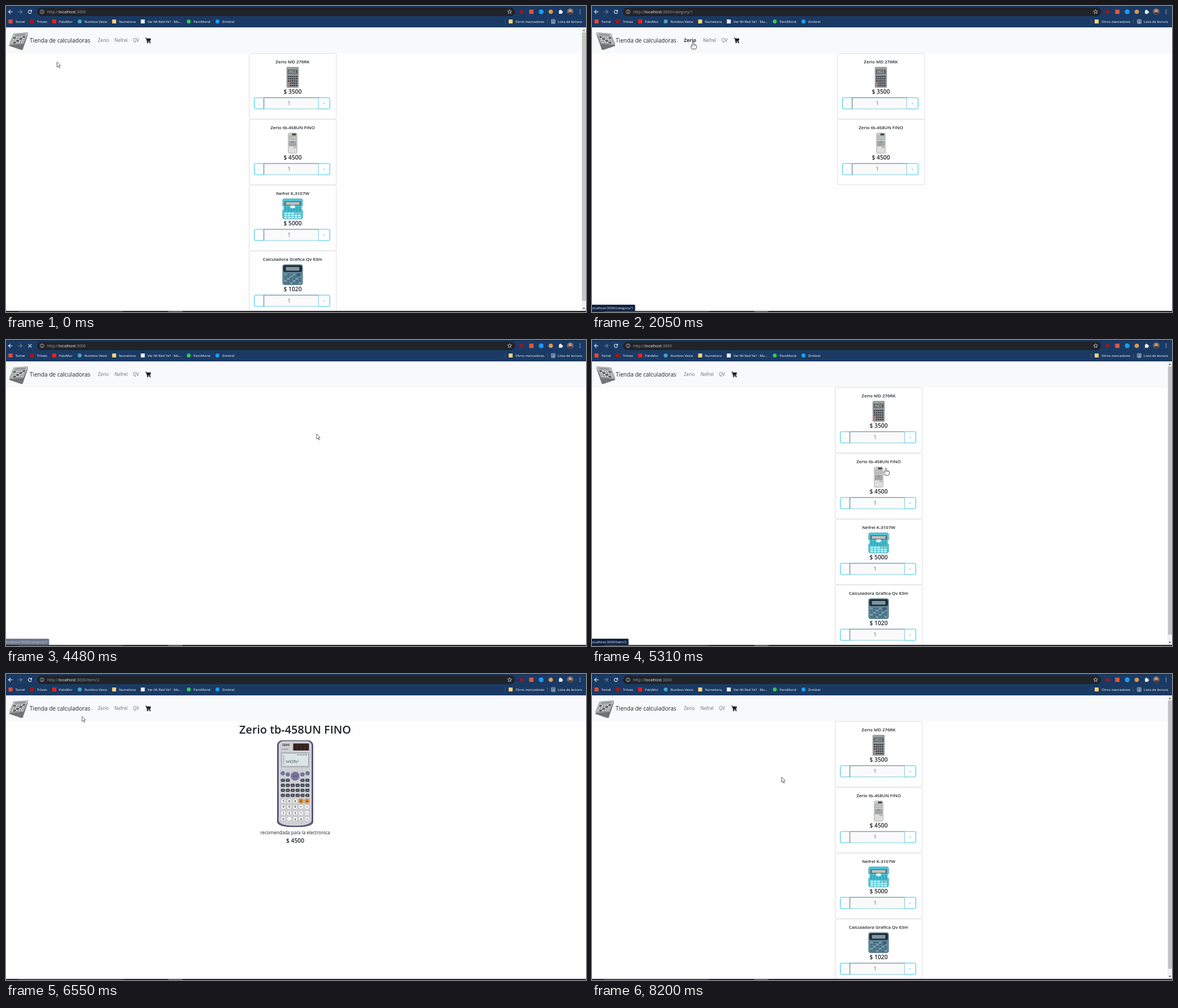
These frames come from a looping animation (1029 px wide and 544 px high, 8530 ms). An HTML page with a canvas:

```html
<!DOCTYPE html>
<html lang="es">
<head>
<meta charset="utf-8">
<title>Tienda de calculadoras</title>
<style>
html, body { margin: 0; width: 100%; height: 100%; overflow: hidden; background: #fefefe; }
canvas { display: block; }
</style>
</head>
<body>
<canvas id="stage" width="1029" height="544"></canvas>
<script>
const W = 1029, H = 544, LOOP = 8530;
const ctx = document.getElementById('stage').getContext('2d');
const FONT = '"Open Sans", "Noto Sans", sans-serif';
const INFO = '#31c3e6', INK = '#212529', PALE = '#e6ebf2';

// ---------- helpers ----------
function rect(x, y, w, h, color) {
  ctx.fillStyle = color;
  ctx.fillRect(x, y, w, h);
}
function paint(fill, stroke, lw = 1) {
  if (fill) { ctx.fillStyle = fill; ctx.fill(); }
  if (stroke) { ctx.strokeStyle = stroke; ctx.lineWidth = lw; ctx.stroke(); }
}
function round(x, y, w, h, r, fill, stroke, lw) {
  ctx.beginPath();
  ctx.roundRect(x, y, w, h, r);
  paint(fill, stroke, lw);
}
function arc(x, y, r, fill, stroke, lw, from = 0, to = 2 * Math.PI) {
  ctx.beginPath();
  ctx.arc(x, y, r, from, to);
  paint(fill, stroke, lw);
}
function shape(pts, fill, stroke, lw) {
  ctx.beginPath();
  for (let i = 0; i < pts.length; i += 2) ctx.lineTo(pts[i], pts[i + 1]);
  if (fill) ctx.closePath();
  paint(fill, stroke, lw);
}
// y is the middle of the capital letters
function text(s, x, y, size, color, weight = 400, align = 'left') {
  ctx.font = `${weight} ${size}px ${FONT}`;
  ctx.textAlign = align;
  ctx.fillStyle = color;
  ctx.fillText(s, x, y + size * 0.36);
  return ctx.measureText(s).width;
}
// evenly spaced keys that fill a box
function keypad(x, y, w, h, cols, rows, color, accent = color, isAccent = () => false) {
  const dx = w / cols, dy = h / rows;
  for (let r = 0; r < rows; r++)
    for (let c = 0; c < cols; c++)
      rect(x + c * dx, y + r * dy, dx * 0.75, dy * 0.65, isAccent(c, r) ? accent : color);
}
function at(x, y, draw) {
  ctx.save();
  ctx.translate(x, y);
  draw();
  ctx.restore();
}

// ---------- timeline ----------
const STEPS = [
  { t: 0, page: 'home', url: '' },
  { t: 1000, page: 'cat1', url: '/category/1' },
  { t: 2540, page: 'cat2', url: '/category/2' },
  { t: 3860, page: 'cat2', url: '', loading: true },
  { t: 4060, page: 'blank', url: '', loading: true },
  { t: 4700, page: 'home', url: '' },
  { t: 5500, page: 'item', url: '/item/2' },
  { t: 7000, page: 'item', url: '', loading: true },
  { t: 7100, page: 'blank', url: '', loading: true },
  { t: 7500, page: 'home', url: '' }
];
const HINTS = [
  { t: 1000, end: 2330, url: '/category/1' },
  { t: 2330, end: 3500, url: '/category/2' },
  { t: 3500, end: 4180, url: '' },
  { t: 4180, end: 4400, url: '/category/2' },
  { t: 5280, end: 5700, url: '/item/2' },
  { t: 5700, end: 5810, url: '/item/2', width: 340 },
  { t: 6750, end: 7350, url: '' }
];
// the pointer rests between trips
const START = [90.5, 99.5], BRAND = [105, 62];
const TRIPS = [
  [240, 860, [177, 64]], [1910, 2740, [208, 61]], [3230, 3790, BRAND], [4060, 4450, [551, 167]],
  [4970, 5450, [514, 243]], [5850, 6690, BRAND], [7350, 7930, [350, 178]], [8130, 8200, [336.5, 183.5]]
];
const current = (list, t) => list.filter(e => e.t <= t).pop();

function pointer(t) {
  let [x, y] = START;
  for (const [from, to, [tx, ty]] of TRIPS) {
    const u = Math.min(1, Math.max(0, (t - from) / (to - from)));
    const k = u * u * (3 - 2 * u);
    x += (tx - x) * k;
    y += (ty - y) * k;
  }
  return [x, y];
}

// ---------- browser ----------
const MARKS = [['Tomel', '#e5483c'], ['Trilvex', '#a3141c'], ['PaloMur', '#f01e1e'],
  ['Rumbos Vexia', '#4aa3c7', true], ['Numelona', '#f6d481'], ['Ver Mi Red Ya? - Mu...', '#e8eef5'],
  ['ParoMond', '#35c759', true], ['Zimbrel', '#1da1f2', true]];

function dot(x, y, r, color, circle) {
  if (circle) arc(x, y, r, color);
  else rect(x - r, y - r, r * 2, r * 2, color);
}
function arrow(x, y, dir, color) {
  const tip = x + 3.5 * dir;
  shape([x - 3.5 * dir, y, tip, y], null, color, 1.1);
  shape([x, y - 3.5, tip, y, x, y + 3.5], null, color, 1.1);
}
function star(x, y, R) {
  const pts = [];
  for (let i = 0; i <= 10; i++) {
    const r = i % 2 ? R * 0.45 : R, a = (i / 5 - 0.5) * Math.PI;
    pts.push(x + r * Math.cos(a), y + r * Math.sin(a));
  }
  shape(pts, null, '#d8dce0', 0.8);
}
function toolbar(t, step) {
  const mid = 10.3, next = STEPS[STEPS.indexOf(step) + 1];
  const idle = step.page === 'blank' && next.t - t <= 215;
  rect(0, 0, W, 38, '#1a3a64');
  rect(0, 0, W, 1, '#122a4a');
  round(55, 2.5, 848, 15.5, 7.7, '#202328');
  arrow(8, mid, -1, PALE);
  arrow(25, mid, 1, '#71869f');
  if (step.loading) {
    for (const s of [-3, 3]) shape([42.5 - s, mid - 3, 42.5 + s, mid + 3], null, PALE, 1.1);
  } else {
    arc(42.5, mid, 3, null, PALE, 1.1, 0.3, 5.4);
    shape([46, 6.5, 46, 10, 42.5, 10], PALE);
  }
  arc(64, mid, 3.4, null, '#c4c8cd', 0.8);
  rect(63.6, 9.8, 0.9, 2.6, '#c4c8cd');
  rect(63.6, 8.1, 0.9, 0.9, '#c4c8cd');
  let x = 73;
  x += text('http://', x, mid, 7.1, '#9aa0a6');
  x += text('localhost', x, mid, 7.1, '#f1f3f4');
  text(':3000' + step.url, x, mid, 7.1, '#9aa0a6');

  star(893.5, mid, 3.9);
  arc(914.5, mid, 3.2, '#9c1a24');
  dot(932, mid, 3.8, idle ? '#c9ced6' : '#e0573f', idle);
  arc(949.5, mid, 4.2, '#1d9bf0');
  arc(966.5, mid, 3.8, '#dc9a53');
  rect(981, 8, 5.6, 5.8, PALE);
  arc(983.6, 7.8, 1.4, PALE);
  arc(986.8, 10.9, 1.4, PALE);
  ctx.save();
  arc(1001, 9.8, 5.6, '#806a62');
  ctx.clip();
  arc(1001, 8.5, 2.5, '#c99a86');
  arc(1001, 15.5, 4.6, '#463f4a');
  ctx.restore();
  for (const d of [-3, 0, 3]) arc(1018.5, mid + d, 0.8, PALE);
}
function bookmarks() {
  const mid = 27.5, label = (s, x) => text(s, x, mid, 6.1, '#fff');
  let x = 8;
  for (const [name, color, circle] of MARKS) {
    dot(x, mid, 3.5, color, circle);
    x += 8.4;
    x += label(name, x) + 12.7;
  }
  rect(885, 23, 0.7, 9, '#4a6485');
  dot(895.3, mid, 3.5, '#f6d481');
  label('Otros marcadores', 904);
  rect(960, 23, 0.7, 9, '#4a6485');
  round(967.5, 24.2, 6.6, 6.8, 0.5, null, '#dfe6ee', 0.8);
  keypad(969, 25.8, 4.4, 5, 2, 3, '#dfe6ee');
  label('Lista de lectura', 979);
}
function scrollbar() {
  rect(1021, 38, 8, 504, '#f1f1f1');
  rect(1022, 47, 7, 477, '#c3c3c3');
  for (const [y, d] of [[43, -1.4], [538, 1.4]])
    shape([1023, y - d, 1025.3, y + d, 1027.6, y - d], '#666');
}
function statusHint(t) {
  const hint = current(HINTS, t);
  if (!hint || t > hint.end + 200) return;
  const label = 'localhost:3000' + hint.url;
  ctx.globalAlpha = Math.min(1, 1 - (t - hint.end) / 200);
  ctx.font = `6.15px ${FONT}`;
  const w = hint.width || ctx.measureText(label).width + 2.5;
  round(-3, 531, w + 3, 12, 1.5, '#0d2244');
  text(label, -1, 536.7, 6.15, '#fff');
  ctx.globalAlpha = 1;
}

// ---------- shop header ----------
function logo(t) {
  const flipped = t >= 390 && Math.floor((t - 390) / 410) % 2 === 0;
  at(23.5, 47, () => {
    if (flipped) ctx.scale(-1, 1);
    shape([-10, 2, 15.5, 0, 15, 5, 6, 31, 3, 31, -17.5, 24, -17.5, 20], '#717375');
    // unit square laid on the tilted face
    ctx.transform(25, -2, -8, 18.5, -9.5, 2.5);
    rect(0, 0, 1, 1.05, '#c4c6c7');
    rect(0.12, 0.07, 0.76, 0.16, '#8f9294');
    rect(0.07, 0.3, 0.86, 0.7, '#77797b');
    keypad(0.1, 0.34, 0.84, 0.66, 5, 4, '#e9e9e9', '#4d4f51', (c, r) => (c + r) % 4 === 0);
  });
}
function cart(x) {
  shape([x, 57, x + 2, 57, x + 3.6, 63.4, x + 9, 63.4], null, '#111', 1.1);
  shape([x + 2.3, 57.8, x + 10, 57.8, x + 8.8, 62.2, x + 3.4, 62.2], '#111');
  for (const d of [4.2, 8.4]) arc(x + d, 65.2, 1.1, '#111');
}
function header(t, page) {
  rect(0, 38, W, 46, '#f8f9fa');
  logo(t);
  text('Tienda de calculadoras', 42, 61.5, 10.1, INK);
  let x = 163;
  for (const [name, width, own] of [['Zerio', 29.6, 'cat1'], ['Nefrel', 32.5, 'cat2'], ['QV', 22]]) {
    const active = own === page;
    text(name, x, 61, active ? 8.6 : 8.1, active ? '#30363b' : '#647679', active ? 700 : 400);
    x += width + (active ? 4.4 : 0);
  }
  cart(x);
}

// ---------- products ----------
// a small calculator, centred on x = 0, 37 px tall
function device(w, r, body, screen, drawKeys) {
  round(-w / 2, 0.5, w, 36.5, r, body, '#0003', 0.8);
  round(-w * 0.41, 5, w * 0.82, 8, 1, screen);
  rect(-w * 0.34, 6.5, w * 0.68, 5, '#b9c5bf');
  drawKeys(-w * 0.4, w * 0.84);
}
const ITEMS = [
  ['Zerio MD 276RK', 3500, () => device(21, 1.5, '#9b9d9f', '#555b5e', (x, w) => {
    text('123456', 0, 9, 4.6, '#30383a', 700, 'center');
    keypad(x, 16, w, 20, 5, 5, '#383e46', '#c06353', (c, r) => c === 0 && r > 2);
  })],
  ['Zerio tb-458UN FINO', 4500, () => device(16, 3, '#cccdca', '#a9b4b0', (x, w) => {
    rect(-1, 1.8, 7, 3, '#4a3d3c');
    keypad(x, 15.5, w, 9, 5, 4, '#787d82');
    arc(0, 17, 2.2, '#93949b');
    keypad(x, 25.5, w, 11, 5, 4, '#f2f2ef', '#d99b62', (c, r) => r === 0 && c > 2);
  })],
  ['Nefrel K-3107W', 5000, () => device(36, 4, '#4cc6da', '#566b73', (x, w) => {
    for (const s of [-1, 1]) arc(s * 20, 17, 4, '#fff');
    keypad(x, 15.5, w, 9, 6, 3, '#2a9eb4');
    round(-4.5, 12.6, 9, 4.8, 2.4, '#e4f6f8');
    keypad(x, 25.5, w, 11.5, 5, 3, '#e8f4f5', '#eab464', (c, r) => r === 0 && c > 2);
  })],
  ['Calculadora Grafica Qv 63m', 1020, () => device(36, 4, '#5f8799', '#202c36', (x, w) => {
    round(-16.5, 2, 33, 12, 3, '#202c36');
    rect(-12, 5, 24, 6.5, '#7d97a2');
    keypad(x, 17, w, 19, 6, 5, '#3f667b', '#7a9dad', (c, r) => (c + r) % 3 === 0);
    arc(11, 19, 3, '#395f76');
  })]
];

function card(n, cx, y, withPic = true) {
  const [name, price, pic] = ITEMS[n], x = cx - 77, top = y + 79;
  round(x, y + 0.5, 154.5, 116.5, 2.5, '#fff', '#dfdfdf');
  text(name, cx, y + 15, 7.9, INK, 600, 'center');
  if (withPic) at(cx, y + 24, pic);
  text('$ ' + price, cx, y + 68.7, 10.3, INK, 600, 'center');
  round(x + 9, top, 17, 20, [2, 0, 0, 2], '#fff', INFO);
  round(x + 123, top, 20, 20, [0, 2, 2, 0], '#fff', INFO);
  rect(x + 26, top, 97, 20, '#fafafa');
  shape([x + 26, top + 20, x + 123, top + 20, x + 123, top], null, '#7fcbe0');
  shape([x + 26, top + 20, x + 26, top, x + 123, top], null, '#4d7080');
  text('-', x + 17.5, top + 10, 7.5, INFO, 400, 'center');
  text('+', x + 133, top + 10.5, 7.5, INFO, 400, 'center');
  text('1', x + 70.5, top + 10, 8.1, '#495057', 400, 'center');
}

function bigDevice() {
  const foot = { x: 24, y: 8 };
  round(-31.5, 0.5, 63, 153, [8, 8, foot, foot], '#625c82', '#4b4667');
  round(-28.5, 2, 57, 149, [7, 7, foot, foot], '#cfd0d4', '#e4e4e8');
  text('ZERIO', -23, 8, 4.6, '#333', 700);
  text('tb-458UN', -24.5, 16, 2.8, '#555');
  rect(-3.5, 5.5, 28, 12.5, '#35211f');
  for (let i = 1; i < 4; i++) rect(-3.5 + i * 7, 5.5, 0.6, 12.5, '#5a3a35');
  round(-25, 21, 50, 27, 2, '#aeb0b8');
  rect(-23, 23.5, 46, 22, '#dbe5e5');
  text('sin(30)÷', -16.5, 37.5, 6.4, '#35434f');
  rect(-20.5, 26, 0.8, 17, '#6c7a82');
  keypad(4, 25, 18, 2, 4, 1, '#6c7a82');
  for (const s of [-1, 1]) {
    arc(s * 22, 58.5, 3.8, '#77739a');
    arc(s * 13, 60.5, 3.8, '#77739a');
  }
  arc(0, 63.5, 8, '#77739a', '#aaa8be', 1.2);
  rect(-4, 62.8, 8, 1.4, '#57537a');
  for (let r = 0; r < 4; r++)
    for (let c = 0; c < 6; c++) {
      if (r === 0 && (c === 2 || c === 3)) continue;
      const x = (c - 2.5) * 8.7, y = 71 + r * 8.9;
      round(x - 3.6, y - 2.8, 7.2, 5.6, 1.8, '#3b3e4a');
      rect(x - 1.6, y - 0.5, 3.3, 0.9, '#d5d7de');
    }
  ['789DA', '456×÷', '123+−', '0.eA='].forEach((row, r) => [...row].forEach((ch, c) => {
    const hot = r === 0 && c > 2, x = (c - 2) * 10.5, y = 107.8 + r * 10.6;
    round(x - 4.5, y - 4.2, 9, 8.4, 3.5, hot ? '#eb912e' : '#f4f4f4', '#a5a6ad', 0.7);
    text(ch, x, y, 5.6, '#333', 600, 'center');
  }));
}
function detail(cx) {
  const [name, price] = ITEMS[1];
  text(name, cx, 98.5, 19.9, INK, 600, 'center');
  at(cx, 118, bigDevice);
  text('recomendada para la electronica', cx, 282.5, 8.1, INK, 400, 'center');
  text('$ ' + price, cx, 295.8, 10.3, INK, 600, 'center');
}

// ---------- pointer ----------
function hand() {
  round(-3.5, 5, 9.5, 7.8, 3, '#fff', '#333', 0.9);
  round(-1.2, 0, 2.4, 9, 1.2, '#fff', '#333', 0.8);
  rect(-0.8, 5.5, 4.5, 4, '#fff');
  for (const x of [1.2, 2.8, 4.4]) rect(x, 5, 0.5, 2.4, '#555');
}
function cursor(t, page) {
  const [x, y] = pointer(t);
  const inside = (x0, x1, y0, y1) => x > x0 && x < x1 && y > y0 && y < y1;
  const link = inside(41, 151, 54, 71) || inside(162, 238, 54, 71) ||
    (page === 'home' && inside(490, 527, 225, 262));
  at(x, y, link ? hand : () =>
    shape([0, 0, 0, 9, 2, 7.2, 3.6, 10.6, 5, 10, 3.5, 6.7, 6.3, 6.4], '#fff', '#333', 0.75));
}

function draw(t) {
  const step = current(STEPS, t), { page } = step;
  rect(0, 0, W, H, '#fefefe');
  header(t, page);
  const list = (count, cx) => {
    for (let n = 0; n < count; n++) card(n, cx, 84 + n * 117);
  };
  if (page === 'home') { list(4, 508.5); scrollbar(); }
  if (page === 'cat1') list(2, 512.5);
  if (page === 'cat2') card(2, 512.5, 84, t >= 2810);
  if (page === 'item') detail(513);
  toolbar(t, step);
  bookmarks();
  statusHint(t);
  rect(0, 542, W, 2, '#20252c');
  rect(22, 542.5, 186, 1.5, '#464b52');
  rect(288, 542.5, 25, 1.5, '#6c7075');
  cursor(t, page);
}

const begin = performance.now();
function tick() {
  draw((performance.now() - begin) % LOOP);
  requestAnimationFrame(tick);
}
tick();
</script>
</body>
</html>
```
